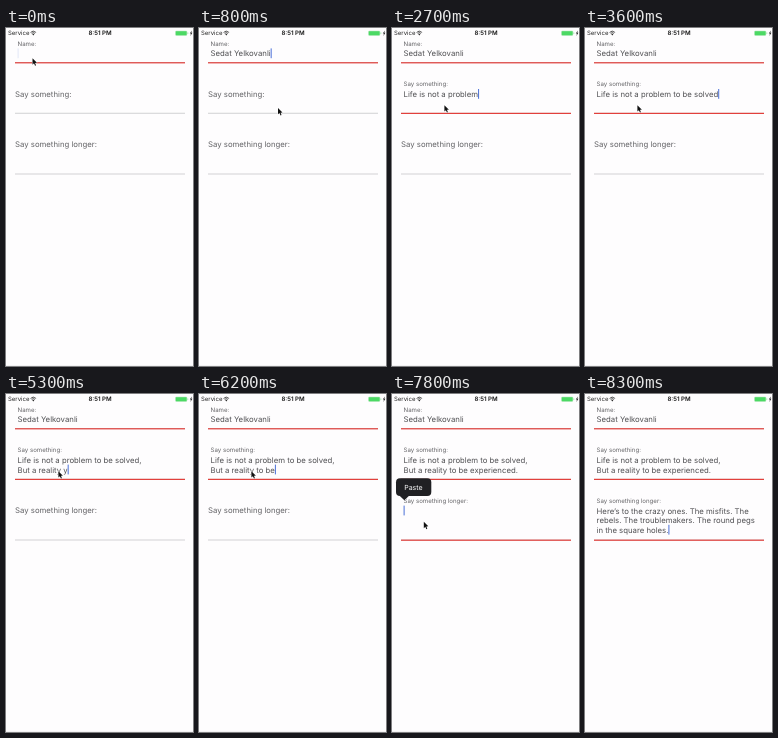
An HTML page with a canvas for the animation above (8.4 s loop, 187 px wide and 338 px high).

```html
<!DOCTYPE html>
<html lang="en">
<head>
<meta charset="utf-8">
<title>Floating label form</title>
<style>
html, body { margin: 0; width: 100%; height: 100%; overflow: hidden; background: #fefdfe; }
canvas { display: block; width: 100vw; height: 100vh; }
</style>
</head>
<body>
<canvas id="stage"></canvas>
<script>
const W = 187, H = 338, LOOP = 8400, STEP = 100;
const FONT = 'Inter, "Liberation Sans", sans-serif';
const BODY = 7.78, SMALL = 6.1, LEADING = 9.6, LEFT = 11.6;
const INK = '#505053', RED = '#e2403c', BLUE = '#4a70d8';

const NAME = 'Sedat Yelkovanli';
const LINE1 = 'Life is not a problem to be solved,\n';
const LINE2 = 'But a reality ';
const TYPO = LINE1 + LINE2 + 'to be experoenced';
const FIXED = LINE1 + LINE2 + 'to be experienced.';
const QUOTE = ['Here’s to the crazy ones. The misfits. The',
  'rebels. The troublemakers. The round pegs',
  'in the square holes.'];

const canvas = document.getElementById('stage');
const ctx = canvas.getContext('2d');

// Piecewise linear value: keys are [time, value, value, ...]
function track(keys, t) {
  if (t <= keys[0][0]) return keys[0].slice(1);
  for (let i = 1; i < keys.length; i++) {
    const a = keys[i - 1], b = keys[i];
    if (t <= b[0]) {
      const k = (t - a[0]) / (b[0] - a[0]);
      return a.slice(1).map((v, j) => v + (b[j + 1] - v) * k);
    }
  }
  return keys[keys.length - 1].slice(1);
}

const ramp = (t, start, length) => Math.min(1, Math.max(0, (t - start) / length));
const easeOut = k => 1 - (1 - k) ** 2;

function text(str, x, y, size, color, weight = 400) {
  ctx.font = `${weight} ${size}px ${FONT}`;
  ctx.fillStyle = color;
  ctx.fillText(str, x, y);
}

function bodyWidth(str) {
  ctx.font = `400 ${BODY}px ${FONT}`;
  return ctx.measureText(str).width;
}

function rect(x, y, w, h, color) {
  ctx.fillStyle = color;
  ctx.fillRect(x, y, w, h);
}

function roundRect(x, y, w, h, r, color) {
  ctx.fillStyle = color;
  ctx.beginPath();
  ctx.roundRect(x, y, w, h, r);
  ctx.fill();
}

function polygon(points, color) {
  ctx.fillStyle = color;
  ctx.beginPath();
  points.forEach(([x, y]) => ctx.lineTo(x, y));
  ctx.closePath();
  ctx.fill();
}

function statusBar() {
  text('Service', 2, 7.4, 6, '#222');
  text('8:51 PM', 82.4, 7.4, 6.1, '#111', 600);
  ctx.strokeStyle = '#222';
  ctx.lineWidth = 0.8;
  for (const r of [2.2, 3.7]) {
    ctx.beginPath();
    ctx.arc(27.3, 7, r, -Math.PI * 0.76, -Math.PI * 0.24);
    ctx.stroke();
  }
  polygon([[27.3, 7.5], [26.3, 6.2], [27.3, 5.8], [28.3, 6.2]], '#222');
  roundRect(169.2, 2.7, 12, 5, 1, '#b5e6bd');
  roundRect(169.8, 3.2, 10.8, 4, 0.6, '#4cd964');
  rect(181.6, 4.4, 0.6, 1.6, '#7fdc8f');
  polygon([[185.8, 2.5], [183.8, 5.5], [185, 5.5], [184.4, 7.9], [186.4, 4.7], [185.3, 4.7]], '#222');
}

// Label, underline and the lines typed so far
function field(label, top, bottom, focus, content, caretAlpha) {
  const k = easeOut(focus);
  const mix = (a, b) => a + (b - a) * k;
  text(label, mix(9, LEFT), mix(top + 10.6, top), mix(BODY, SMALL), '#646467');
  rect(9, bottom, 170, 0.8, '#c6c6c8');
  if (k > 0) {
    ctx.globalAlpha = k;
    rect(9, bottom, 170, 1.2, RED);
    ctx.globalAlpha = 1;
  }
  const lines = content.split('\n');
  const baseline = i => top + 10.7 + i * LEADING;
  lines.forEach((line, i) => text(line, LEFT, baseline(i), BODY, INK));
  if (caretAlpha) {
    const last = lines.length - 1;
    ctx.globalAlpha = caretAlpha;
    rect(LEFT + bodyWidth(lines[last]), baseline(last) - 7.9, 1, 9.8, BLUE);
    ctx.globalAlpha = 1;
  }
}

function sayText(t) {
  if (t >= 7200) return FIXED;
  if (t >= 7100) return FIXED.slice(0, -1);
  if (t === 5300 || t === 5400) return LINE1 + LINE2 + 'y';
  const n1 = LINE1.length, n2 = n1 + LINE2.length;
  const [count] = track([[1300, 0], [1800, 5], [2700, 21], [3600, 34], [3700, 35],
    [4100, n1], [4500, n1 + 4], [5200, n2], [5500, n2], [6300, n2 + 6],
    [6800, TYPO.length]], t);
  return TYPO.slice(0, Math.round(count));
}

function highlight() {
  const x = LEFT + bodyWidth(LINE2 + 'to be ');
  rect(x, 70.8, bodyWidth('experoenced'), 9.8, '#b8d1ea');
}

function suggestion() {
  ctx.save();
  ctx.shadowColor = 'rgba(0,0,0,.28)';
  ctx.shadowBlur = 2 * scale();
  ctx.shadowOffsetY = 0.5 * scale();
  roundRect(76.3, 82, 51, 10.8, 3, '#fff');
  ctx.restore();
  text('experience', 78, 90.5, 7.7, '#3d72d2');
  text('×', 120, 90.2, 7, '#b4b4b8');
}

function pasteMenu() {
  const dark = '#202023';
  roundRect(4, 84.3, 35.3, 17.8, 4, dark);
  polygon([[7.8, 102], [12.3, 106.3], [16.8, 102]], dark);
  text('Paste', 12.2, 95.8, 7, '#fff');
}

function pointer(t) {
  if (t >= 8200) return;
  const [x, y] = track([[0, 26.5, 30.3], [600, 26.5, 30.3], [800, 79, 80], [1000, 56, 77.5],
    [1100, 52.4, 77.2], [7300, 52.4, 77.2], [7500, 31.8, 127.8], [7800, 31.8, 127.8],
    [7900, 21, 94], [8000, 21, 94], [8100, 96, 281]], t);
  ctx.save();
  ctx.translate(x, y);
  ctx.scale(0.88, 0.88);
  ctx.beginPath();
  [[0, 0], [0, 7.2], [1.7, 5.7], [2.9, 8.4], [4, 7.9], [2.9, 5.3], [5.1, 5.1]]
    .forEach(([px, py]) => ctx.lineTo(px, py));
  ctx.closePath();
  ctx.lineJoin = 'round';
  ctx.lineWidth = 0.9;
  ctx.strokeStyle = '#fff';
  ctx.stroke();
  ctx.fillStyle = '#111';
  ctx.fill();
  ctx.restore();
}

const scale = () => canvas.width / W;

function draw(t) {
  ctx.setTransform(scale(), 0, 0, canvas.height / H, 0, 0);
  ctx.textRendering = 'geometricPrecision';
  rect(0, 0, W, H, '#fefdfe');
  rect(0, 337, W, 1, '#f3f2f3');
  statusBar();

  const typed = NAME.slice(0, Math.round(ramp(t, 0, 700) * NAME.length));
  field('Name:', 17.6, 34.2, 1, typed, t === 0 ? 0.15 : t < 1000 ? 1 : 0);

  const correcting = t >= 6800 && t < 7100;
  if (correcting) highlight();
  const inSay = t >= 1000 && t < 7500;
  field('Say something:', 58.2, 84.8, ramp(t, 900, 300), sayText(t), inSay ? 1 : 0);
  if (correcting) suggestion();

  const rows = t >= 8200 ? 3 : t >= 8000 ? 2 : 0;
  field('Say something longer:', 108.8, 145.6, ramp(t, 7400, 300),
    QUOTE.slice(0, rows).join('\n'), t >= 7500 ? 1 : 0);
  if (t >= 7700 && t < 8000) pasteMenu();
  pointer(t);
}

function resize() {
  const dpr = window.devicePixelRatio || 1;
  canvas.width = Math.round(innerWidth * dpr);
  canvas.height = Math.round(innerHeight * dpr);
}

const start = performance.now();
function tick() {
  const t = Math.max(0, performance.now() - start) % LOOP;
  draw(Math.floor(t / STEP) * STEP);
  requestAnimationFrame(tick);
}

addEventListener('resize', resize);
resize();
tick();
</script>
</body>
</html>
```
